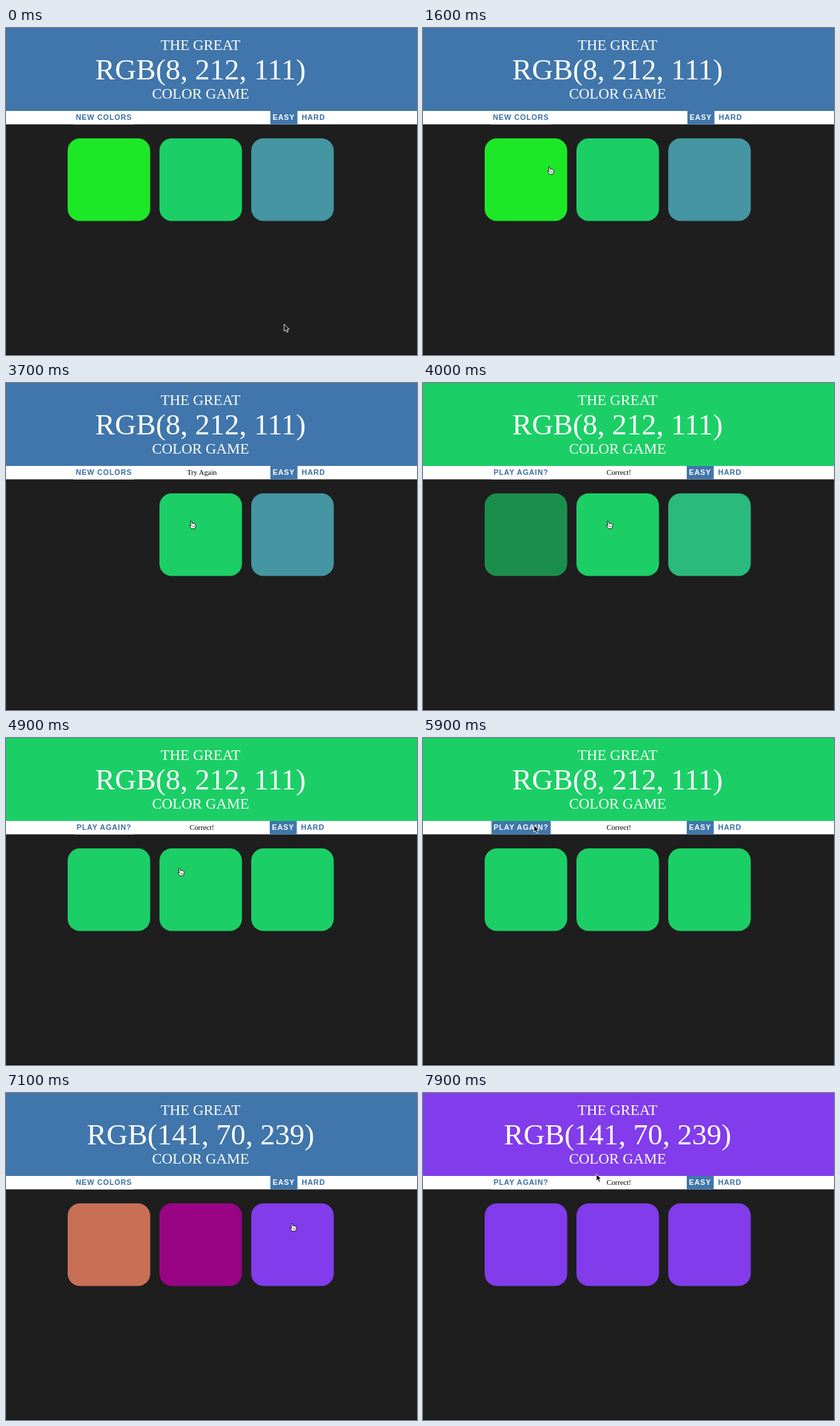
Recreate the animation shown at these times as an HTML page. Size 600 px wide and 477 px high, loop 8 s.

```html
<!DOCTYPE html>
<html lang="en">
<head>
<meta charset="utf-8">
<title>Color Game</title>
<style>
  html, body { margin: 0; width: 100%; height: 100%; overflow: hidden; background: #1e1e1e; }
  svg { display: block; width: 100vw; height: 100vh; }
  .title { font-family: "Liberation Serif", serif; font-size: 21.5px; fill: #fff; text-anchor: middle; }
  .big { font-size: 43px; }
  .message { font-family: "Liberation Serif", serif; font-size: 10.75px; text-anchor: middle; }
  .button { font: bold 10.75px "Liberation Sans", sans-serif; letter-spacing: .8px; }
</style>
</head>
<body>
<svg viewBox="0 0 600 477">
  <rect width="600" height="477" fill="#1e1e1e"/>
  <rect y="476" width="600" height="1" fill="#0c0c0c"/>
  <rect id="header" width="600" height="121"/>
  <text class="title" x="284" y="32">THE GREAT</text>
  <text class="title big" id="goal" x="284" y="75"></text>
  <text class="title" x="284" y="103">COLOR GAME</text>
  <rect y="121" width="600" height="19.5" fill="#fff"/>
  <rect id="resetBox" y="121" height="19.5"/>
  <text class="button" id="reset" y="134"></text>
  <text class="message" id="message" x="286" y="134"></text>
  <g id="modes">
    <rect x="386" y="121" width="39.5" height="19.5" fill="#4076ab"/>
    <text class="button" x="389.3" y="134" fill="#fff">EASY</text>
    <text class="button" x="431.7" y="134" fill="#376ea4">HARD</text>
  </g>
  <g id="squares">
    <rect x="90" y="161" width="120.5" height="120.5" rx="18"/>
    <rect x="224" y="161" width="120.5" height="120.5" rx="18"/>
    <rect x="358" y="161" width="120.5" height="120.5" rx="18"/>
  </g>
  <path id="arrow" d="M0 0V10.2L2.3 8.2L4 12L5.8 11.2L4.2 7.5H7.2Z" fill="#000" stroke="#fff" stroke-width=".9"/>
  <g id="hand" fill="#fff" stroke="#000" stroke-width=".8" stroke-linejoin="round">
    <path d="M-.9 .8Q0-.5 .9 .8L1.8 4Q3 3.2 3.7 4.2Q5 3.6 5.4 4.7Q6.9 4.5 7 6V8.5L5.7 11.6H.9L-1.9 8.1Q-2.7 6.3-1.3 6.5L.1 7.6Z"/>
    <path d="M2 7.2V9.6M3.6 7.2V9.6M5.2 7.2V9.6" stroke-width=".5"/>
  </g>
</svg>
<script>
const LOOP = 8000, STEP = 100;
const MISS = 2820, WIN = 3780, RESTART = 6050, SECOND_WIN = 7200;
const HOVER_IN = 5400, HOVER_OUT = 6300;

const BLUE = [64, 118, 171], LABEL = [55, 110, 164], WHITE = [255, 255, 255];
const DARK = [30, 30, 30], GREEN = [27, 207, 102], PURPLE = [130, 60, 235];

// Each track lists [start time, colour].
const squareTracks = [
  [[0, [29, 232, 39]], [MISS, DARK], [WIN, GREEN], [RESTART, [200, 112, 86]], [SECOND_WIN, PURPLE]],
  [[0, GREEN], [RESTART, [152, 4, 131]], [SECOND_WIN, PURPLE]],
  [[0, [69, 149, 163]], [WIN, GREEN], [RESTART, PURPLE]]
];

// Pointer positions: [time, x, y].
const pointerPath = [
  [0, 406, 432], [500, 406, 432], [1000, 296, 301], [1500, 184, 202], [2200, 184, 202],
  [2700, 166, 187], [3100, 166, 187], [3650, 270, 201], [4700, 270, 201],
  [5500, 162, 127], [6100, 162, 127], [6900, 417, 190], [7250, 417, 190], [7900, 253, 118]
];

const $ = id => document.getElementById(id);
const clamp = v => Math.min(1, Math.max(0, v));
const smooth = v => v * v * (3 - 2 * v);
const mix = (a, b, p) => a + (b - a) * p;
const mixColor = (a, b, p) => a.map((v, i) => mix(v, b[i], p));
const css = c => `rgb(${c.map(Math.round)})`;

// The CSS "ease" curve: cubic-bezier(.25, .1, .25, 1).
function ease(x) {
  const bezier = (a, b, u) => 3 * a * u * (1 - u) ** 2 + 3 * b * u * u * (1 - u) + u ** 3;
  let low = 0, high = 1;
  for (let i = 0; i < 20; i++) {
    const mid = (low + high) / 2;
    if (bezier(.25, .25, mid) < x) low = mid; else high = mid;
  }
  return bezier(.1, 1, low);
}

function colorAt(track, time) {
  let color = track[0][1];
  for (const [start, next] of track.slice(1)) {
    if (time >= start) color = mixColor(color, next, ease(clamp((time - start) / 600)));
  }
  return color;
}

function pointerAt(time) {
  const next = pointerPath.findIndex(key => key[0] > time);
  if (next < 0) return pointerPath.at(-1).slice(1);
  const [t0, x0, y0] = pointerPath[next - 1], [t1, x1, y1] = pointerPath[next];
  const p = smooth((time - t0) / (t1 - t0));
  return [mix(x0, x1, p), mix(y0, y1, p)];
}

function render(time) {
  const secondRound = time >= RESTART;
  const won = time >= SECOND_WIN || (time >= WIN && !secondRound);

  $("header").setAttribute("fill", css(!won ? BLUE : secondRound ? PURPLE : GREEN));
  $("goal").textContent = secondRound ? "RGB(141, 70, 239)" : "RGB(8, 212, 111)";
  $("message").textContent = won ? "Correct!" : time >= MISS && !secondRound ? "Try Again" : "";
  $("modes").setAttribute("transform", `translate(${won ? -1 : 0})`);

  const hover = ease(clamp((time - HOVER_IN) / 300)) * (1 - ease(clamp((time - HOVER_OUT) / 300)));
  const reset = $("reset"), box = $("resetBox");
  reset.textContent = won ? "PLAY AGAIN?" : "NEW COLORS";
  reset.setAttribute("x", won ? 103 : 102);
  reset.setAttribute("fill", css(mixColor(LABEL, WHITE, hover)));
  box.setAttribute("x", won ? 100 : 98.7);
  box.setAttribute("width", won ? 86.5 : 88);
  box.setAttribute("fill", css(mixColor(WHITE, BLUE, hover)));

  [...$("squares").children].forEach((square, i) =>
    square.setAttribute("fill", css(colorAt(squareTracks[i], time))));

  const [x, y] = pointerAt(time);
  const overSquare = y > 161 && y < 281.5 && [90, 224, 358].some(left => x > left && x < left + 120.5);
  for (const [id, shown] of [["hand", overSquare], ["arrow", !overSquare]]) {
    $(id).setAttribute("transform", `translate(${x} ${y})`);
    $(id).setAttribute("visibility", shown ? "visible" : "hidden");
  }
}

function tick() {
  render(Math.floor(performance.now() % LOOP / STEP) * STEP);
  requestAnimationFrame(tick);
}
tick();
</script>
</body>
</html>
```
